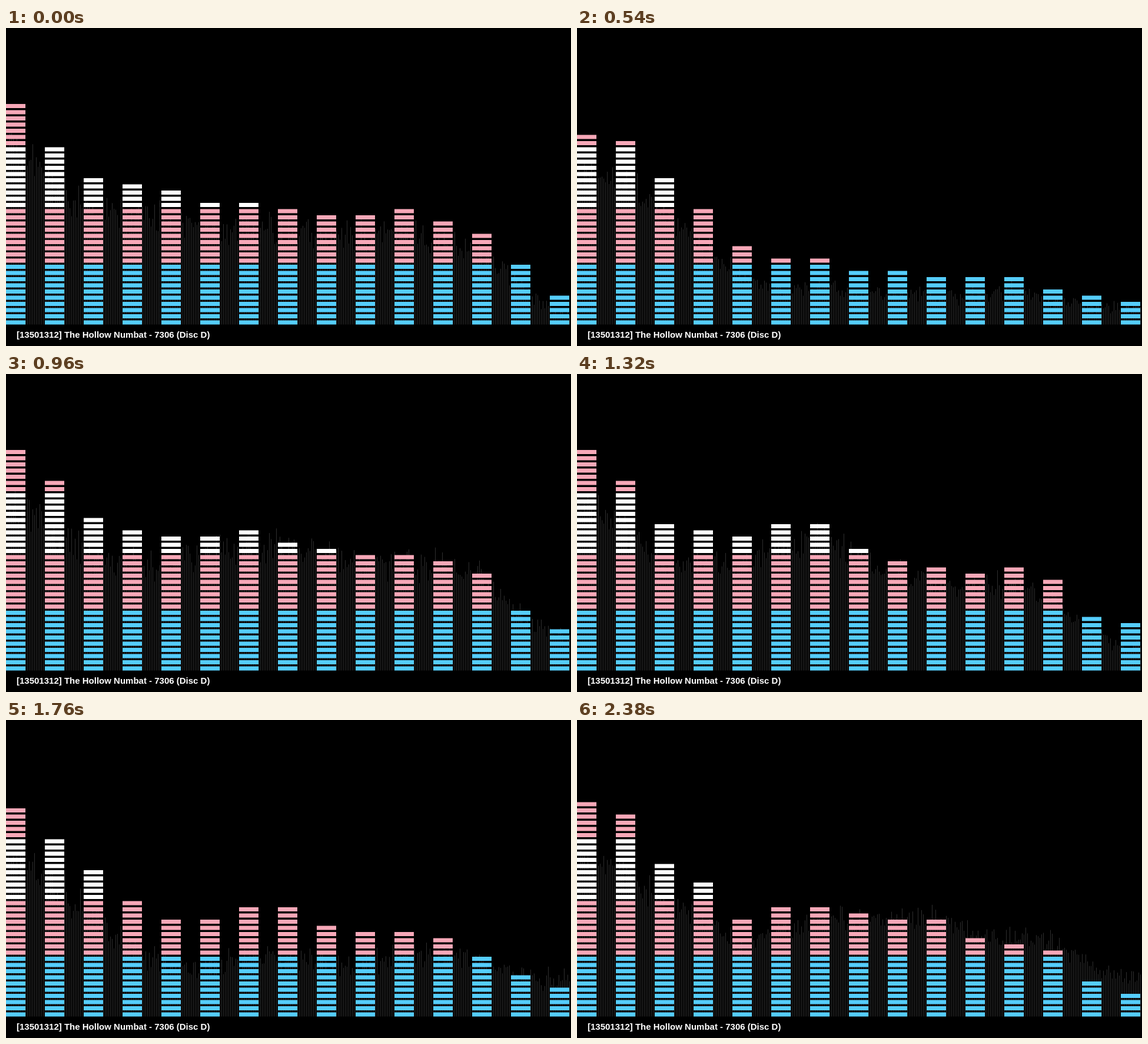
Recreate the animation shown at these times as an HTML page with a canvas. Size 960 px wide and 540 px high, loop 2.4 s.

```html
<!DOCTYPE html>
<html lang="en">
<head>
<meta charset="utf-8">
<title>Spectrum</title>
<style>
  html, body { margin: 0; width: 100%; height: 100%; overflow: hidden; background: #000; }
  canvas { display: block; }
  p {
    position: absolute; left: 18px; top: 512px; margin: 0;
    font: bold 15px/17px "Liberation Sans", Arial, sans-serif;
    color: #fff; white-space: nowrap;
  }
</style>
</head>
<body>
<canvas width="960" height="540"></canvas>
<p>[13501312] The Hollow Numbat - 7306 (Disc D)</p>
<script>
const ctx = document.querySelector('canvas').getContext('2d');
const LOOP = 2400, STEP = 20, FLOOR = 503.5, PITCH = 10.5, SPACING = 66;
const BLUE = '#55cdfc', PINK = '#f7a8b8', WHITE = '#fff';

// Lit segments per bar, and how far the thin lines sit below the bars (left, middle, right).
const poses = [
  { at: 0,    bars: [36, 29, 24, 23, 22, 20, 20, 19, 18, 18, 19, 17, 15, 10, 5], drop: [75, 42, 38] },
  { at: 540,  bars: [31, 30, 24, 19, 13, 11, 11, 9, 9, 8, 8, 8, 6, 5, 4],        drop: [78, 45, 15] },
  { at: 960,  bars: [36, 31, 25, 23, 22, 22, 23, 21, 20, 19, 19, 18, 16, 10, 7], drop: [105, 15, 15] },
  { at: 1320, bars: [36, 31, 24, 23, 22, 24, 24, 20, 18, 17, 16, 17, 15, 9, 8],  drop: [95, 20, 42] },
  { at: 1760, bars: [34, 29, 24, 19, 16, 16, 18, 18, 15, 14, 14, 13, 10, 7, 5],  drop: [85, 85, -12] },
  { at: 2100, bars: [35, 31, 26, 23, 20, 20, 20, 20, 18, 18, 18, 16, 14, 10, 5], drop: [105, 36, 0] },
  { at: 2380, bars: [35, 33, 25, 22, 16, 18, 18, 17, 16, 16, 13, 12, 11, 6, 4],  drop: [110, 12, -25] },
];

const mix = (a, b, u) => a + (b - a) * u;
const clamp = (v, lo, hi) => Math.min(hi, Math.max(lo, v));

function hash(a, b) {
  const s = Math.sin(a * 127.1 + b * 311.7) * 43758.5453;
  return s - Math.floor(s);
}

// Reads a list at a fractional position.
function sample(list, pos) {
  const i = clamp(Math.floor(pos), 0, list.length - 2);
  return mix(list[i], list[i + 1], clamp(pos - i, 0, 1));
}

// Value noise over time, from -1 to 1, repeating with the loop.
function flicker(id, time, period) {
  const count = LOOP / period, k = Math.floor(time / period);
  return mix(hash(id, k), hash(id, (k + 1) % count), time / period - k) * 2 - 1;
}

function poseAt(time) {
  const i = Math.max(0, poses.findLastIndex(p => p.at <= time));
  const a = poses[i], b = poses[i + 1] || a;
  const u = a === b ? 0 : (time - a.at) / (b.at - a.at);
  const wobble = Math.sin(Math.PI * u);
  return {
    bars: a.bars.map((n, k) => Math.round(mix(n, b.bars[k], u) + wobble * flicker(k + 500, time, 80))),
    drop: a.drop.map((d, k) => mix(d, b.drop[k], u)),
  };
}

function segmentColor(n) {
  if (n < 10 || n >= 38) return BLUE;
  return n >= 19 && n < 29 ? WHITE : PINK;
}

function draw(time) {
  const { bars, drop } = poseAt(time);
  ctx.fillStyle = '#000';
  ctx.fillRect(0, 0, 960, 540);

  ctx.fillStyle = '#2e2e2e';
  for (let i = 0; i < 320; i++) {
    const x = i * 3;
    const level = sample(bars, (x - 16) / SPACING) * PITCH - sample(drop, x / 480);
    const noise = flicker(i, time, 80) + 0.6 * flicker(i + 1000, time, 40);
    const height = Math.max(12, level + noise * (10 + level * 0.07));
    ctx.fillRect(x, FLOOR - height, 1, height);
  }

  bars.forEach((count, i) => {
    for (let n = 0; n < count; n++) {
      ctx.fillStyle = segmentColor(n);
      ctx.fillRect(i * SPACING, FLOOR - 7 - n * PITCH, 33, 7);
    }
  });
}

function tick() {
  const time = performance.now() % LOOP;
  draw(Math.floor(time / STEP) * STEP);
  requestAnimationFrame(tick);
}
tick();
</script>
</body>
</html>
```
